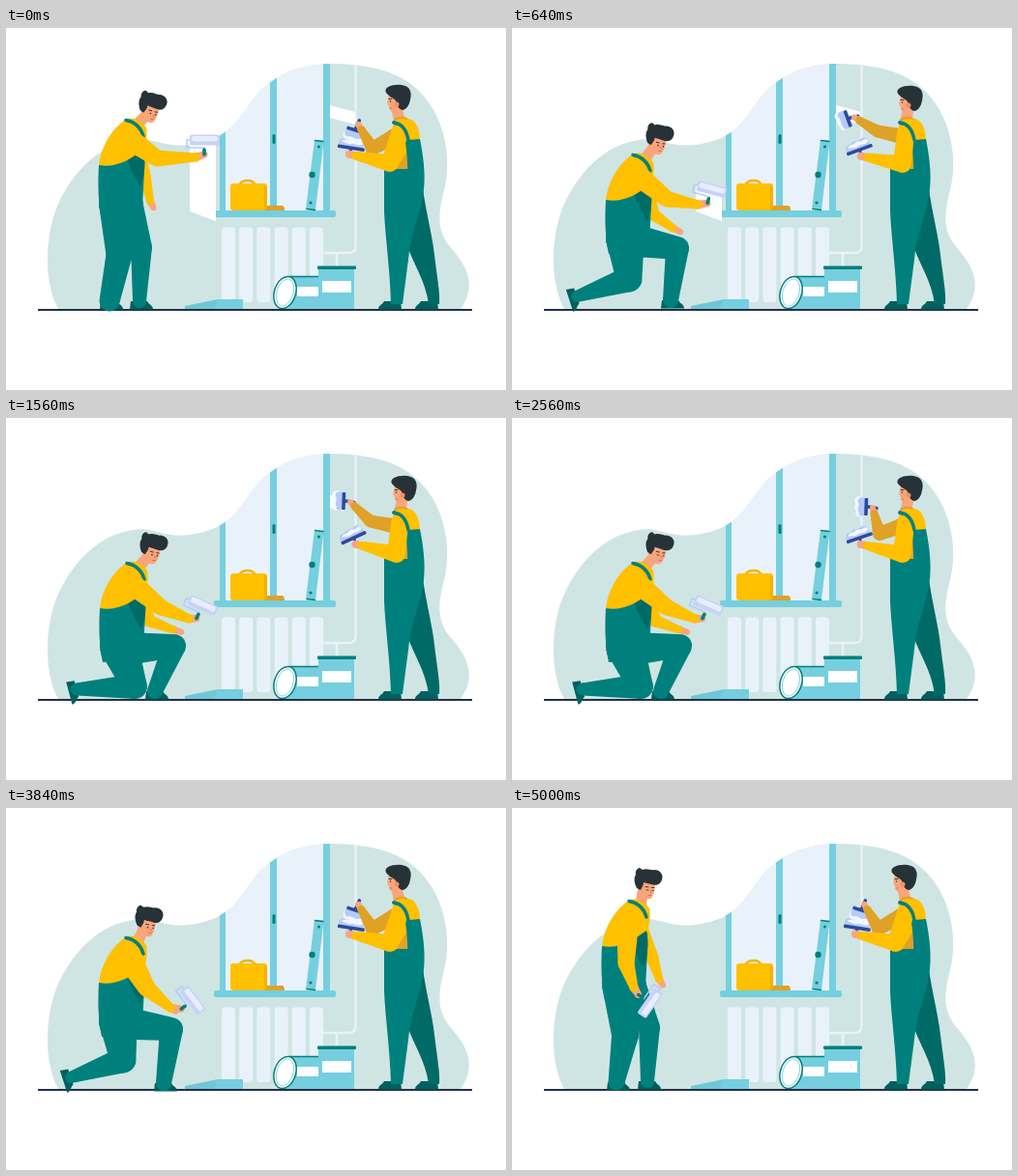
Recreate the animation shown at these times as an HTML page with a canvas. Size 517 px wide and 375 px high, loop 5040 ms.

```html
<!DOCTYPE html>
<html lang="en">
<head>
<meta charset="utf-8">
<title>Renovation</title>
<style>
  html, body { margin: 0; width: 100%; height: 100%; overflow: hidden; background: #fff; }
  canvas { display: block; width: 517px; height: 375px; }
</style>
</head>
<body>
<canvas id="stage"></canvas>
<script>
const W = 517, H = 375, LOOP = 5040, STEP = 40;
const stage = document.getElementById('stage');
const dpr = window.devicePixelRatio || 1;
stage.width = W * dpr;
stage.height = H * dpr;
const c = stage.getContext('2d');

const wall = '#cfe5e4', glass = '#e9f2fa', frame = '#75cfde', teal = '#00807c',
  shade = '#006a67', shoe = '#00605e', yellow = '#ffc000', ochre = '#dfa126',
  skin = '#f9a57c', hair = '#263238', navy = '#2b4a9f', ice = '#b5cbf8', line = '#22304a';

// ---- drawing helpers
const fill = (color, d) => { c.fillStyle = color; c.fill(new Path2D(d)); };
const stroke = (color, w, d) => {
  c.strokeStyle = color;
  c.lineWidth = w;
  c.lineCap = 'round';
  c.stroke(new Path2D(d));
};
const box = (color, x, y, w, h, r = 0) => {
  c.fillStyle = color;
  c.beginPath();
  c.roundRect(x, y, w, h, r);
  c.fill();
};
const at = (x, y, deg, draw) => {
  c.save();
  c.translate(x, y);
  c.rotate(deg * Math.PI / 180);
  draw();
  c.restore();
};
const local = ([x, y, deg], px, py) => {
  const a = deg * Math.PI / 180, s = Math.sin(a), k = Math.cos(a);
  return [x + px * k - py * s, y + px * s + py * k];
};
const mix = (a, b, k) => a.map((v, i) => v + (b[i] - v) * k);

// tapered limb through joints given as [x, y, width]
function limb(color, ...joints) {
  c.fillStyle = color;
  joints.forEach(([x, y, w], i) => {
    c.beginPath();
    c.arc(x, y, w / 2, 0, 7);
    c.fill();
    if (!i) return;
    const [px, py, pw] = joints[i - 1];
    const d = Math.hypot(x - px, y - py) || 1;
    const nx = (py - y) / d / 2, ny = (x - px) / d / 2;
    c.beginPath();
    c.moveTo(px + nx * pw, py + ny * pw);
    c.lineTo(x + nx * w, y + ny * w);
    c.lineTo(x - nx * w, y - ny * w);
    c.lineTo(px - nx * pw, py - ny * pw);
    c.fill();
  });
}

// smooth interpolation that rests wherever a value holds or turns
const track = (times, keys) => t => {
  if (t >= times[times.length - 1]) return keys[keys.length - 1];
  const i = times.findIndex(v => v > t) - 1;
  const span = times[i + 1] - times[i], u = (t - times[i]) / span;
  const slope = (k, n) => k < 0 || k >= keys.length - 1 ? 0
    : (keys[k + 1][n] - keys[k][n]) / (times[k + 1] - times[k]);
  const tangent = (k, n) => {
    const a = slope(k - 1, n), b = slope(k, n);
    return a * b > 0 ? 2 * a * b / (a + b) : 0;
  };
  return keys[i].map((p, n) => {
    const q = keys[i + 1][n];
    return p + (q - p) * u * u * (3 - 2 * u)
      + span * u * (1 - u) * ((1 - u) * tangent(i, n) - u * tangent(i + 1, n));
  });
};

// painter poses: reach, half kneel, kneel, rise, stand
const paintTimes = [0, 640, 1160, 3360, 3840, 4520];
const paint = (a, b, k, r, s) => track(paintTimes, [a, b, k, k, r, s]);
const painter = {
  torso: paint([0, 0], [1, 36], [1, 55], [0, 39], [-3, 1]),
  head: paint([152, 77, 8], [153, 110, 5], [153, 130, 5], [148, 112, 2], [141, 73, 0]),
  elbow: paint([156, 135, 17], [160, 177, 17], [160, 196, 17], [145, 186, 18], [118, 161, 17]),
  wrist: paint([196, 134, 9], [192, 183, 9], [189, 208, 9], [170, 207, 9], [126, 186, 9]),
  farElbow: paint([144, 155, 12], [146, 193, 13], [148, 210, 13], [150, 190, 13], [145, 155, 13]),
  farWrist: paint([149, 179, 8], [166, 207, 8], [172, 219, 8], [168, 206, 8], [152, 177, 8]),
  knee: paint([117, 235, 27], [121, 260, 27], [133, 278, 26], [121, 261, 27], [117, 235, 28]),
  ankle: paint([107, 283, 21, 0], [67, 278, 12, 72], [73, 281, 13, 75], [67, 279, 12, 72], [108, 284, 17, 0]),
  frontKnee: paint([140, 227, 22], [171, 228, 24], [174, 236, 24], [171, 229, 24], [142, 227, 22]),
  frontAnkle: paint([138, 283, 14], [164, 282, 16], [154, 283, 16], [163, 285, 16], [140, 283, 14]),
  roller: paint([205, 116, 0], [206, 167, 15], [203, 194, 24], [193, 199, 52], [143, 202, 125])
};

// plasterer poses: load, touch wall, spread, pull back, scoop, load
const coatTimes = [0, 640, 1560, 2560, 3200, 3800];
const coat = (a, b, s, p, k) => track(coatTimes, [a, b, s, p, k, a]);
const plasterer = {
  head: coat([405, 72], [411, 73], [411, 73], [411, 73], [408, 72]),
  elbow: coat([397, 140, 18], [404, 141, 18], [404, 141, 18], [404, 141, 18], [399, 141, 18]),
  farElbow: coat([379, 125, 14], [378, 107, 13], [377, 107, 13], [380, 120, 14], [380, 122, 14]),
  hod: coat([357, 123, 9], [359, 125, -20], [359, 123, -25], [359, 123, -19], [358, 123, -4]),
  trowel: coat([361, 106, 18], [347, 94, 70], [349, 86, 92], [366, 92, 92], [361, 102, 45])
};

const blob = new Path2D('M54,291C38,262 40,210 56,178C72,146 100,116 142,115C160,117 172,126 200,119' +
  'C236,112 243,88 262,66C284,44 310,37 338,37C385,38 420,48 441,83C457,110 460,145 452,172' +
  'C445,200 448,214 462,230C484,255 482,275 470,291Z');

function room() {
  c.fillStyle = wall;
  c.fill(blob);
  c.save();
  c.clip(blob);
  box(glass, 222, 30, 112, 160);
  for (const [x, w] of [[221, 6], [273, 7], [328, 7]]) box(frame, x, 30, w, 160);
  stroke(glass, 2.5, 'M361.5,38V226Q361.5,233 354,233H328M342,233V248');
  c.restore();
  box(teal, 275.5, 110, 3, 10, 1.5);
  box(frame, 215, 189, 126, 7, 2);
  for (let i = 0; i < 6; i++) box(glass, 223 + i * 18.2, 206.5, 14, 77.5, 3);
}

function props() {
  stroke('#f0b400', 2.5, 'M241,163Q243,158 250,158Q256,158 258,163');
  box(yellow, 232, 161, 38, 28, 3);
  fill(ochre, 'M267,189V184H286Q288,185 288,189Z');
  fill('#f0b400', 'M267,163L270,165V187L267,189Z');
  fill(frame, 'M319,116L328.500,117L320,188.500L310,187.500Z');
  stroke(teal, 1.5, 'M319.500,116.500L328,117.500M311,187.500L319.500,188.500');
  for (const [x, y, r] of [[323.5, 123, 1.5], [316.5, 152, 3.2], [315, 181, 1.6]]) {
    limb(teal, [x, y, r * 2]);
  }
  fill('#6fc7d5', 'M185,291V288L219,281H245V291Z');
  fill(frame, 'M219,281H245V291H215Z');
  fill(frame, 'M292,257H325V291H284Z');
  stroke(teal, 1.5, 'M293,257.500H325');
  box('#fff', 301, 268, 23, 10);
  at(288.5, 274, 17, () => {
    c.beginPath();
    c.ellipse(0, 0, 11, 17, 0, 0, 7);
    c.fillStyle = '#fff';
    c.fill();
    c.strokeStyle = teal;
    c.lineWidth = 1.5;
    c.stroke();
    c.beginPath();
    c.ellipse(0, 0, 8.5, 14.5, 0, 0, 7);
    c.strokeStyle = frame;
    c.lineWidth = 0.8;
    c.stroke();
  });
  box(frame, 323, 249, 37, 42);
  box(teal, 322, 246.5, 40, 3.5, 1);
  box('#fff', 327, 262, 30, 12);
}

function barePatches(t, [x, y, deg]) {
  if (t < 1160) {
    const tilt = Math.tan(deg * Math.PI / 180);
    const left = Math.min(190, y - 15 * tilt), right = Math.min(200, y + 12 * tilt);
    fill('#fff', `M190,${left}L217,${right}V200L190,190Z`);
  }
  if (t < 2200) {
    const edge = 361 - 12 * Math.min(1, Math.max(0, (t - 560) / 1000)) - 14 * Math.max(0, (t - 1600) / 600);
    const drop = (edge - 335) * 0.27;
    if (edge > 335) fill('#fff', `M335,80L${edge},${80 + drop}V${93 + drop}L335,93Z`);
  }
}

const boot = (x, y, deg, dir = 1) => at(x, y, deg, () => {
  c.scale(dir, 1);
  fill(shoe, 'M-9,0H8C10,4 14,4 14,8.500H-10Z');
});

function paintRoller([x, y, deg]) {
  at(x, y, deg, () => {
    stroke(ice, 1.5, 'M-14,0H-18V8H0V11');
    box('#c6d3f8', -15, -5.5, 31, 11, 2.5);
    box('#e9eefd', -13, -4, 27, 5.5, 2);
  });
}

function painterHead([x, y, deg], blink) {
  at(x, y, deg, () => {
    fill(skin, 'M-11,2L-11,13C-8,20 -3,22 2,21C5,19 7,12 7,4Z');
    limb('#ef9069', [-9, 9, 5]);
    fill(hair, 'M-12,10C-15,4 -15,-1 -13,-4C-14,-8 -11,-11 -9,-11L-6,-9C-1,-11 3,-8 6,-9' +
      'C12,-9 16,-4 14,1C13,6 8,8 3,6C0,5 -3,5 -5,4C-5,8 -7,9 -8,12Z');
    stroke(hair, 0.9, 'M-3,8.500L0,9M3.500,9.500L6,9.500');
    if (blink) stroke(hair, 0.8, 'M-2,12H0M4,12.500H5.500');
    else { limb(hair, [-1, 11.8, 1.6]); limb(hair, [4.5, 12.3, 1.6]); }
    stroke('#d8704f', 0.9, 'M2,13L3,15M0,17.500H3');
  });
}

function drawPainter(t) {
  const p = {};
  for (const k in painter) p[k] = painter[k](t);
  const [tx, ty] = p.torso;
  const joint = (x, y, w) => [x + tx, y + ty, w];
  const grip = local(p.roller, 0, 15);

  const reach = mix(p.farElbow, p.farWrist, 1.3);
  limb(skin, p.farWrist, [reach[0] + 2, reach[1], 6]);
  limb(yellow, joint(135, 122, 16), p.farElbow, p.farWrist);

  boot(p.frontAnkle[0], p.frontAnkle[1], 0);
  limb(teal, joint(125, 184, 34), p.frontKnee, p.frontAnkle);
  boot(p.ankle[0], p.ankle[1], p.ankle[3]);
  limb(teal, joint(116, 182, 40), p.knee, p.ankle);

  const [hx, hy] = local(p.head, -6, 15);
  limb(skin, [hx, hy, 11], joint(136, 100, 12));
  at(tx, ty, 0, () => {
    fill(yellow, 'M122,96C128,91 138,94 145,103C147,112 144,122 143,132L128,140L96,144C97,126 108,106 122,96Z');
    fill(teal, 'M96,142C108,144 118,141 127,136L143,128C144,148 141,172 141,196L99,198C95,180 95,160 96,142Z');
    fill(shade, 'M126,137L142,126C145,140 143,154 139,164C134,156 129,148 126,137Z');
    stroke(teal, 3.5, 'M124,95.500C133,97 139,102 142,112');
  });
  painterHead(p.head, Math.abs(t - 2560) < 100 || t > 4900);

  paintRoller(p.roller);
  limb(skin, p.wrist, [...grip, 7]);
  limb(yellow, joint(123, 112, 24), p.elbow, p.wrist);
  const tip = local(p.roller, 0, 10);
  limb(teal, [...grip, 3.5], [...tip, 3.5]);
}

function drawHod([x, y, deg]) {
  at(x, y, deg, () => {
    fill(ice, 'M-13,0C-15,-5 -11,-9 -7,-7C-3,-11 1,-7 4,-9C9,-11 13,-7 12,0Z');
    fill('#f4f7ff', 'M-11,-4C-8,-8 -5,-5 -2,-7C2,-9 4,-5 7,-7C10,-8 12,-6 11,-4C7,-1 4,-4 0,-3C-4,-1 -7,-4 -11,-4Z');
    box(navy, -14, -0.5, 28, 3.5, 1);
    stroke(navy, 3, 'M0,3L-1,9');
  });
}

function drawTrowel([x, y, deg]) {
  at(x, y, deg, () => {
    fill('#f4f7ff', 'M-9,2H9C12,7 9,12 5,10C2,13 -2,10 -5,12C-10,12 -12,7 -9,2Z');
    fill(ice, 'M-9,1H9C11,5 9,8 6,7C3,10 -1,6 -4,8C-8,10 -11,6 -9,1Z');
    box(navy, -9, -2, 18, 3.6, 1);
    stroke(navy, 3.5, 'M0,-2L1,-11');
  });
}

function drawPlasterer(t) {
  const p = {};
  for (const k in plasterer) p[k] = plasterer[k](t);
  const [hx, hy] = p.head;

  const hand = local(p.trowel, 1, -7);
  const cuff = mix(hand, p.farElbow.slice(0, 2), 0.22);
  drawHod(p.hod);
  drawTrowel(p.trowel);
  limb(skin, [...hand, 6], [...cuff, 7]);
  limb(ochre, [402, 112, 16], p.farElbow, [...cuff, 8]);

  boot(437, 283, 0, -1);
  boot(399, 283, 0, -1);
  fill(shade, 'M431,166C434,190 441,215 443,235C446,260 449,275 448,286L437,286C434,262 420,242 416,228C414,206 422,190 431,166Z');
  limb(skin, [hx - 1, hy + 11, 11], [407, 97, 12]);
  fill(yellow, 'M401,98C406,92 417,92 422,97C427,103 428,110 428,118L418,148H392C396,130 397,112 401,98Z');
  stroke(ochre, 2, 'M402,95Q408,91 414,94');
  fill(ochre, 'M402,148L416,126L418,148Z');
  fill(teal, 'M391,146H416V116L428,115C431,130 434,150 432,167C430,190 418,212 416,240L410,286H398C397,250 392,215 391,190Z');
  stroke(teal, 3.5, 'M401,98C411,100 416,110 417,146');

  at(hx, hy, 0, () => {
    fill(skin, 'M-9,-4C-10,3 -12,6 -9,9C-9,15 -4,17 2,15L7,5L-1,-5Z');
    fill(hair, 'M-12,-5C-15,-11 -5,-14 4,-13C13,-12 15,-5 13,2C12,9 8,13 5,13C1,12 -1,8 -2,3C-5,0 -9,-1 -12,-5Z');
    limb('#ef9069', [-1, 7, 5]);
    stroke(hair, 0.9, 'M-9,1.500H-6');
    limb(hair, [-7.5, 4, 1.5]);
    stroke('#d8704f', 0.9, 'M-8,11H-6');
  });

  const grip = local(p.hod, -1, 8);
  const wrist = mix(grip, p.elbow.slice(0, 2), 0.17);
  limb(skin, [...grip, 8], [...wrist, 8]);
  limb(yellow, [407, 109, 18], p.elbow, [...wrist, 9]);
  stroke(teal, 3.5, 'M401,98C409,99 414,105 416,116');
}

function draw(t) {
  c.setTransform(dpr, 0, 0, dpr, 0, 0);
  c.fillStyle = '#fff';
  c.fillRect(0, 0, W, H);
  room();
  barePatches(t, painter.roller(t));
  props();
  box(line, 33, 291, 449, 2);
  drawPainter(t);
  drawPlasterer(t);
}

const start = performance.now();
function tick() {
  const t = (performance.now() - start) % LOOP;
  draw(Math.floor(t / STEP) * STEP);
  requestAnimationFrame(tick);
}
tick();
</script>
</body>
</html>
```
